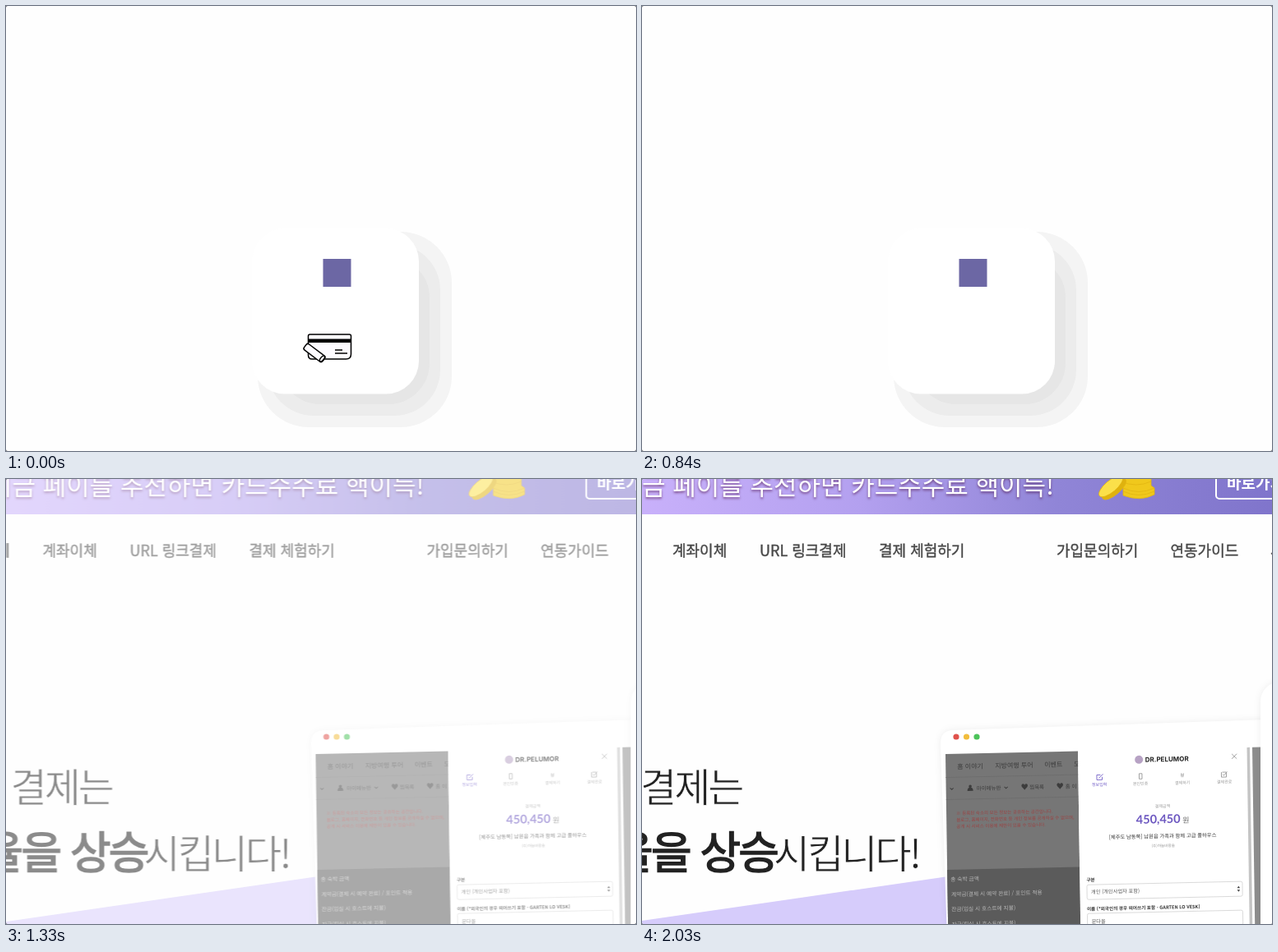
Write an HTML page that moves like this. It is 766 px wide and 542 px high and loops after 2.1 s.

```html
<!DOCTYPE html>
<html lang="ko">
<head>
<meta charset="utf-8">
<style>
  html, body { margin: 0; width: 100%; height: 100%; overflow: hidden; background: #555; }
  svg { display: block; width: 766px; height: 542px; background: #fefefe; border-radius: 2px; }
  text { font-family: "Noto Sans CJK KR", "Noto Sans CJK", "Noto Sans", sans-serif; white-space: pre; }
  .shade { filter: drop-shadow(0 0 4px #0001); }
  .nav { font-size: 18px; fill: #484848; stroke: #484848; stroke-width: .4; }
  .light { font-size: 48px; letter-spacing: -3px; stroke: #fefefe; stroke-width: .8; }
  .bold { font-size: 54px; letter-spacing: -2.7px; stroke: #222; stroke-width: 1.5; }
  .menu { font-size: 8px; fill: #3c3c3c; }
  .sub { font-size: 6.5px; fill: #3c3c3c; }
  .red { font-size: 5.5px; fill: #9b4444; }
  .list { font-size: 6.7px; fill: #b8b8b8; }
  .mid { text-anchor: middle; }
  .step { font-size: 5px; fill: #999; }
  .label { font-size: 5.6px; font-weight: 700; fill: #333; }
  .field { font-size: 6.2px; fill: #555; }
  .icon { fill: none; stroke: #999; stroke-width: .9; }
</style>
</head>
<body>
<svg viewBox="0 0 766 542">
  <defs>
    <linearGradient id="violet">
      <stop stop-color="#c9b1fb"/><stop offset=".35" stop-color="#b3a0ef"/>
      <stop offset=".65" stop-color="#9085d7"/><stop offset="1" stop-color="#7f74cb"/>
    </linearGradient>
    <clipPath id="track"><rect x="344" y="380" width="157" height="70"/></clipPath>
  </defs>

  <g id="tile">
    <rect x="306" y="275" width="236" height="238" rx="62" fill="#f4f4f4"/>
    <rect x="318" y="290" width="210" height="209" rx="56" fill="#ececec"/>
    <rect x="332" y="305" width="183" height="180" rx="50" fill="#e6e6e6"/>
    <rect x="299" y="271" width="203" height="201.5" rx="40" fill="#fff"/>
    <rect x="385.5" y="308" width="34" height="34" fill="#6c67a4"/>
    <g clip-path="url(#track)">
      <g id="lines" fill="none" stroke-width="2" stroke-linecap="round">
        <path stroke="#24222e" d="M378 407h27M370 415.5h27M372 424h27"/>
        <path stroke="#786cb8" d="M382 410h27M374 418.5h27M377 427h27"/>
      </g>
      <g id="card" fill="#fdfbff" stroke="#000" stroke-width="1.5">
        <path d="M369.500 400H417.500Q419.500 400 419.500 402V424Q419.500 430 413.500 430H372Q367.500 430 367.500 425V402Q367.500 400 369.500 400Z"/>
        <path d="M367.500 407.800H419.500" stroke-width="4.600"/>
        <path d="M400 419H409M400 423H415"/>
        <g transform="translate(375 422.500) rotate(37)">
          <rect x="-14" y="-4.500" width="28" height="9" rx="2.500"/>
          <ellipse cx="11.800" rx="2" ry="4.200"/>
        </g>
      </g>
    </g>
  </g>

  <g id="page">
    <rect x="-10" width="790" height="43" fill="url(#violet)"/>
    <g fill="#fff">
      <text x="501" y="18.500" text-anchor="end" font-size="31" style="text-shadow:0 2px 3px #4038">지금 페이를 추천하면 카드수수료 핵이득!</text>
      <rect x="698" y="-20" width="110" height="44" rx="4" fill="none" stroke="#fff" stroke-width="2"/>
      <text x="711" y="12" font-size="19" font-weight="700">바로가기</text>
    </g>
    <g stroke="#e3b512" stroke-width=".8">
      <path fill="#f0c81c" d="M582 -3H619V8L623 11V19Q606 28 585 20V11L582 8Z"/>
      <path fill="none" d="M582 3Q601 11 619 3M585 11Q604 20 623 11M585 15Q604 24 623 15"/>
      <g transform="translate(570 9) rotate(-40)">
        <ellipse cx="1" cy="5" rx="18" ry="7" fill="#dfb20e"/>
        <ellipse rx="18" ry="7" fill="#fbe04a"/>
      </g>
    </g>

    <g class="nav">
      <text x="-3" y="94" text-anchor="end" font-weight="700">카드결제</text>
      <text x="37" y="94">계좌이체</text>
      <text x="143" y="94">URL 링크결제</text>
      <text x="288" y="94">결제 체험하기</text>
      <text x="504" y="94">가입문의하기</text>
      <text x="642.500" y="94">연동가이드</text>
      <text x="764" y="94">서비스</text>
    </g>

    <path fill="#d6ccfb" d="M-10 539.400L400 480V560H-10Z"/>
    <g fill="#222">
      <text class="light" x="-2" y="393">결제는</text>
      <text class="bold" x="-36" y="474.500">율을 상승</text>
      <text class="light" x="160" y="474">시킵니다!</text>
    </g>

    <path class="shade" fill="#fff" d="M363 322Q363 307 377 306L775 292.500V560H371Z"/>
    <circle cx="382" cy="314" r="3.600" fill="#e0524c"/>
    <circle cx="394.500" cy="314" r="3.600" fill="#f2bd3c"/>
    <circle cx="407" cy="314" r="3.600" fill="#4cc35a"/>

    <g transform="matrix(1 -.022 .015 1 -5.03 8.12)">
      <path fill="#767676" d="M369 335H530V570H369Z"/>
      <path fill="#6e6e6e" d="M369 363H530V364H369ZM369 390H530V391H369Z"/>
      <path fill="#5b5b5b" d="M369 476H530V570H369Z"/>
      <g class="menu">
        <text x="383" y="353.500">홈 이야기</text>
        <text x="429" y="353.500">지방여행 투어</text>
        <text x="489" y="353.500">이벤트</text>
        <text x="525" y="353.500">모</text>
      </g>
      <g class="sub">
        <path d="M395 380.500q0-4 3.500-4t3.500 4z"/><circle cx="398.500" cy="375" r="1.800"/>
        <text x="406" y="380">마이메뉴판</text>
        <text x="460" y="380.500" font-size="9">♥</text><text x="470.500" y="380">찜목록</text>
        <text x="503" y="380.500" font-size="9">♥</text><text x="514" y="380">홈 이</text>
        <path d="M374 376.500l2 2 2-2M440 376.500l2 2 2-2" fill="none" stroke="#3c3c3c"/>
      </g>
      <g class="red">
        <text x="381" y="409.500">※ 등록된 숙소의 모든 정보는 공유하는 공간입니다.</text>
        <text x="381" y="417.500">블로그, 홈페이지, 전화번호 등 개인 정보를 공개하실 수 없으며,</text>
        <text x="381" y="425.500">공개 시 서비스 이용에 제한이 있을 수 있습니다.</text>
      </g>
      <g class="list">
        <text x="373" y="490">총 숙박 금액</text>
        <text x="373.500" y="508.500">계약금(결제 시 예약 완료) / 포인트 적용</text>
        <text x="373.500" y="526.500">잔금(입실 시 호스트에 지불)</text>
        <text x="373.500" y="545">잔금(퇴실 시 호스트에 지불)</text>
      </g>

      <path fill="#fff" d="M530 335H737V570H530Z"/>
      <path fill="#c4c4c4" d="M735.500 335H739V570H735.500Z"/>
      <path fill="#8e8e8e" d="M742 335H754V570H742Z"/>
      <circle cx="604" cy="347" r="5" fill="#b7a2c4"/>
      <text x="611.500" y="350" font-size="8" font-weight="700" fill="#222" style="font-family:Inter,sans-serif">DR.PELUMOR</text>
      <path class="icon" d="M717 342.500l6 6M723 342.500l-6 6"/>

      <path class="icon" style="stroke:#7460c8" d="M557 364.500H552.500V370.500H559V367M555 368.500L560 363.500"/>
      <path class="icon" d="M604 364H607.500V370.500H604ZM705 364.500H710V370.500H704V364.500M705.500 367L707 368.500L711 364"/>
      <g class="step mid">
        <text x="656.500" y="369.500" font-size="7">₩</text>
        <text x="555.500" y="378" style="fill:#7460c8">정보입력</text>
        <text x="605.500" y="378">본인인증</text>
        <text x="656.500" y="378">결제하기</text>
        <text x="707.500" y="378">결제완료</text>
        <text x="632" y="406">결제금액</text>
        <text x="632" y="454" font-size="4.600">(주)하늘바람솔</text>
      </g>
      <text x="599.500" y="425" font-size="14.500" font-weight="700" fill="#6c57c0" style="font-family:Lato,sans-serif">450,450</text>
      <text x="656" y="425" font-size="9" fill="#666">원</text>
      <text class="mid" x="631.500" y="443" font-size="6.300" fill="#333">[제주도 남동쪽] 남원읍 가족과 함께 고급 풀하우스</text>

      <text class="label" x="538" y="494">구분</text>
      <text class="label" x="538" y="529.500">이름 (*외국인의 경우 띄어쓰기 포함 - GARTEN LO VESK)</text>
      <g fill="#fff" stroke="#d2d2d2" stroke-width=".8">
        <rect x="538.500" y="498" width="189" height="18" rx="2"/>
        <rect x="538.500" y="533" width="189" height="18" rx="2"/>
      </g>
      <text class="field" x="543.500" y="509">개인 (개인사업자 포함)</text>
      <text class="field" x="543.500" y="545">문다올</text>
      <path fill="#444" d="M721 506l1.800-2.500 1.800 2.500zM721 508l1.800 2.500 1.800-2.500z"/>
    </g>

    <rect class="shade" x="752" y="247" width="120" height="400" rx="24" fill="#fff"/>
  </g>
</svg>
<script>
  const LOOP = 2100, STEP = 70;
  const [tile, card, lines, page] = ["tile", "card", "lines", "page"].map(id => document.getElementById(id));
  const ramp = (t, from, to) => Math.min(1, Math.max(0, (t - from) / (to - from)));
  const move = (el, x, rest = "") => el.setAttribute("transform", `translate(${x} 0) ${rest}`);

  function draw(now) {
    const t = Math.floor(now % LOOP / STEP) * STEP;

    // The card glides in, rests, then speeds off leaning forward
    const arrive = 10 * (1 - (1 - ramp(t, 0, 210)) ** 2);
    const dash = 44 * (Math.max(0, t - 280) / 280) ** 2;
    const lean = -11 * ramp(t, 280, 560);
    move(card, arrive + dash, `translate(0 415) skewX(${lean}) translate(0 -415)`);
    move(lines, dash - 44);
    lines.setAttribute("opacity", ramp(t, 420, 490));
    tile.setAttribute("opacity", 1 - ramp(t, 840, 1050));

    // The page fades in, then slides a little to the left
    const slide = ramp(t, 1400, 1680);
    page.setAttribute("opacity", ramp(t, 1210, 1440) * (t >= 1260));
    move(page, 7.5 * (1 - slide * slide * (3 - 2 * slide)));
    requestAnimationFrame(draw);
  }
  draw(performance.now());
</script>
</body>
</html>
```
